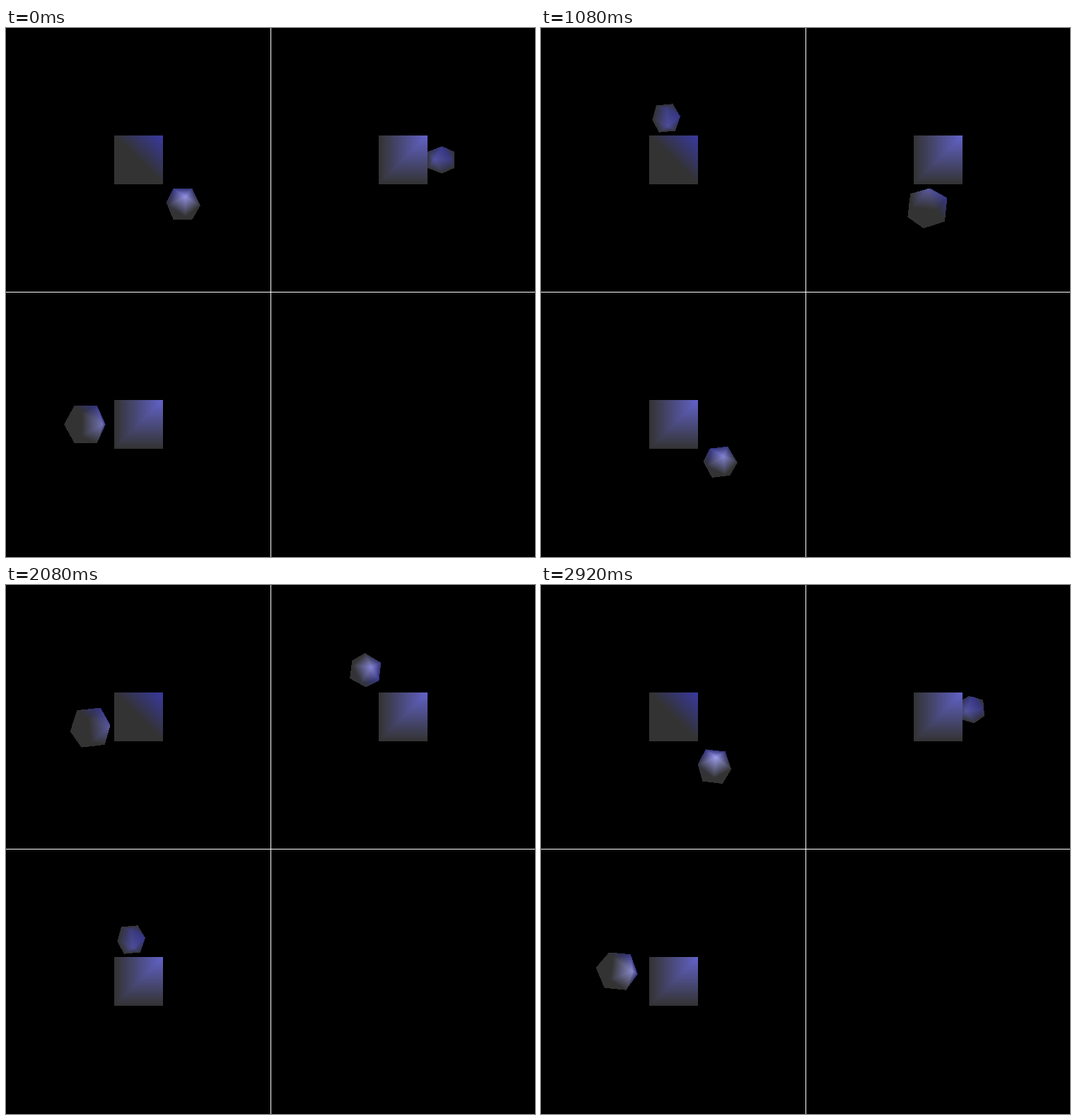
An HTML page with a canvas for the animation above (3.01 s loop, 748 px wide and 748 px high).

```html
<!DOCTYPE html>
<html lang="en">
<head>
<meta charset="utf-8">
<title>Orbiting icosahedron, three views</title>
<style>
html, body { margin: 0; width: 100%; height: 100%; overflow: hidden; background: #000; }
canvas { display: block; width: 748px; height: 748px; }
</style>
</head>
<body>
<canvas id="stage" width="748" height="748"></canvas>
<script>
const SIZE = 748, LOOP = 3010, STEPS = 36;
const FOCAL = 374, EYE = [0, 0, 6], LIGHT = [0.85, 0.85, 0.85];
const RADIUS = 0.411, HALF = 0.5, AMBIENT = 51;
const DIFFUSE = 0.42, SPECULAR = 0.45, SHININESS = 8;

const ctx = document.getElementById('stage').getContext('2d');
const image = ctx.createImageData(SIZE, SIZE);
const pixels = new Uint32Array(image.data.buffer);

// Each view reorders the world axes to right, up, toward the viewer.
// cut: the cube face is split from top left to bottom right.
const views = [
  { axes: [0, 1, 2], cx: 187.5, cy: 186.5, cut: true, normal: [2, 2, 1] },
  { axes: [0, 2, 1], cx: 561.5, cy: 186.5, cut: false, normal: [2, 1, 2] },
  { axes: [1, 2, 0], cx: 187.5, cy: 560.5, cut: false, normal: [2, 1, 2] }
];

const dot = (a, b) => a[0] * b[0] + a[1] * b[1] + a[2] * b[2];
const add = (a, b, s = 1) => a.map((v, i) => v + b[i] * s);
const unit = a => a.map(v => v / Math.hypot(...a));

// Icosahedron: cyclic permutations of (±X, ±Z, 0)
const X = 0.525731, Z = 0.850651;
const verts = [];
for (const x of [-X, X]) for (const z of [-Z, Z]) verts.push([x, z, 0], [0, x, z], [z, 0, x]);

const near = (i, j) => Math.hypot(...add(verts[i], verts[j], -1)) < 1.1;
const faces = [];
for (let i = 0; i < 12; i++)
  for (let j = i + 1; j < 12; j++)
    for (let k = j + 1; k < 12; k++)
      if (near(i, j) && near(j, k) && near(i, k)) faces.push([i, j, k]);

// Rotation about the (1,1,1) axis
function spin(v, angle) {
  const c = Math.cos(angle), s = Math.sin(angle) / Math.sqrt(3);
  const m = (v[0] + v[1] + v[2]) / 3 * (1 - c);
  return [
    v[0] * c + (v[2] - v[1]) * s + m,
    v[1] * c + (v[0] - v[2]) * s + m,
    v[2] * c + (v[1] - v[0]) * s + m
  ];
}

// Vertex light as [white, blue]
function shade(point, normal) {
  const toLight = unit(add(LIGHT, point, -1));
  const lit = dot(normal, toLight);
  if (lit <= 0) return [AMBIENT, AMBIENT];
  const half = unit(add(toLight, unit(add(EYE, point, -1))));
  const gloss = SPECULAR * Math.max(0, dot(normal, half)) ** SHININESS;
  const white = AMBIENT + 255 * gloss;
  return [white, Math.min(255, white + 255 * DIFFUSE * lit)];
}

function project(view, p, color) {
  const k = FOCAL / (EYE[2] - p[2]);
  return { x: view.cx + p[0] * k, y: view.cy - p[1] * k, color };
}

function triangle(a, b, c) {
  const area = (b.x - a.x) * (c.y - a.y) - (c.x - a.x) * (b.y - a.y);
  if (Math.abs(area) < 1e-6) return;
  const x0 = Math.floor(Math.min(a.x, b.x, c.x)), x1 = Math.ceil(Math.max(a.x, b.x, c.x));
  const y0 = Math.floor(Math.min(a.y, b.y, c.y)), y1 = Math.ceil(Math.max(a.y, b.y, c.y));
  for (let y = y0; y <= y1; y++) {
    for (let x = x0; x <= x1; x++) {
      const px = x + 0.5 - a.x, py = y + 0.5 - a.y;
      const v = (px * (c.y - a.y) - (c.x - a.x) * py) / area;
      const w = ((b.x - a.x) * py - px * (b.y - a.y)) / area;
      const u = 1 - v - w;
      if (Math.min(u, v, w) < -1e-6) continue;
      const mix = i => Math.round(a.color[i] * u + b.color[i] * v + c.color[i] * w);
      const white = mix(0);
      pixels[y * SIZE + x] = (0xff000000 | mix(1) << 16 | white << 8 | white) >>> 0;
    }
  }
}

function drawCube(view) {
  const dark = [AMBIENT, AMBIENT];
  const corner = (x, y, color) => project(view, [x * HALF, y * HALF, HALF], color);
  const tr = corner(1, 1, shade([HALF, HALF, HALF], unit(view.normal)));
  const tl = corner(-1, 1, dark), bl = corner(-1, -1, dark), br = corner(1, -1, dark);
  if (view.cut) {
    triangle(tl, bl, br);
    triangle(tl, br, tr);
  } else {
    triangle(bl, br, tr);
    triangle(bl, tr, tl);
  }
}

function drawSolid(view, center, normals) {
  const points = normals.map(n => add(center, n, RADIUS));
  const corners = points.map((p, i) => project(view, p, shade(p, normals[i])));
  for (const [i, j, k] of faces) {
    const out = add(add(normals[i], normals[j]), normals[k]);
    if (dot(out, add(EYE, points[i], -1)) > 0) triangle(corners[i], corners[j], corners[k]);
  }
}

function draw(step) {
  const angle = step * 2 * Math.PI / STEPS;
  const center = spin([1, -1, 0], angle);
  const normals = verts.map(v => spin(v, angle));
  pixels.fill(0xff000000);
  for (const view of views) {
    const look = v => view.axes.map(i => v[i]);
    const pos = look(center);
    const solid = () => drawSolid(view, pos, normals.map(look));
    if (pos[2] < 0) solid();
    drawCube(view);
    if (pos[2] >= 0) solid();
  }
  ctx.putImageData(image, 0, 0);
  ctx.fillStyle = '#fff';
  ctx.fillRect(374, 0, 1, SIZE);
  ctx.fillRect(0, 373, SIZE, 1);
}

// Twelve steps a second, changing on whole hundredths
function stepAt(time) {
  const t = Math.floor(time % LOOP / 10) * 10 + 5;
  return Math.min(STEPS - 1, Math.floor(t * 12 / 1000));
}

let shown = -1;
function tick(now) {
  const step = stepAt(now);
  if (step !== shown) draw(shown = step);
  requestAnimationFrame(tick);
}
draw(shown = 0);
requestAnimationFrame(tick);
</script>
</body>
</html>
```
